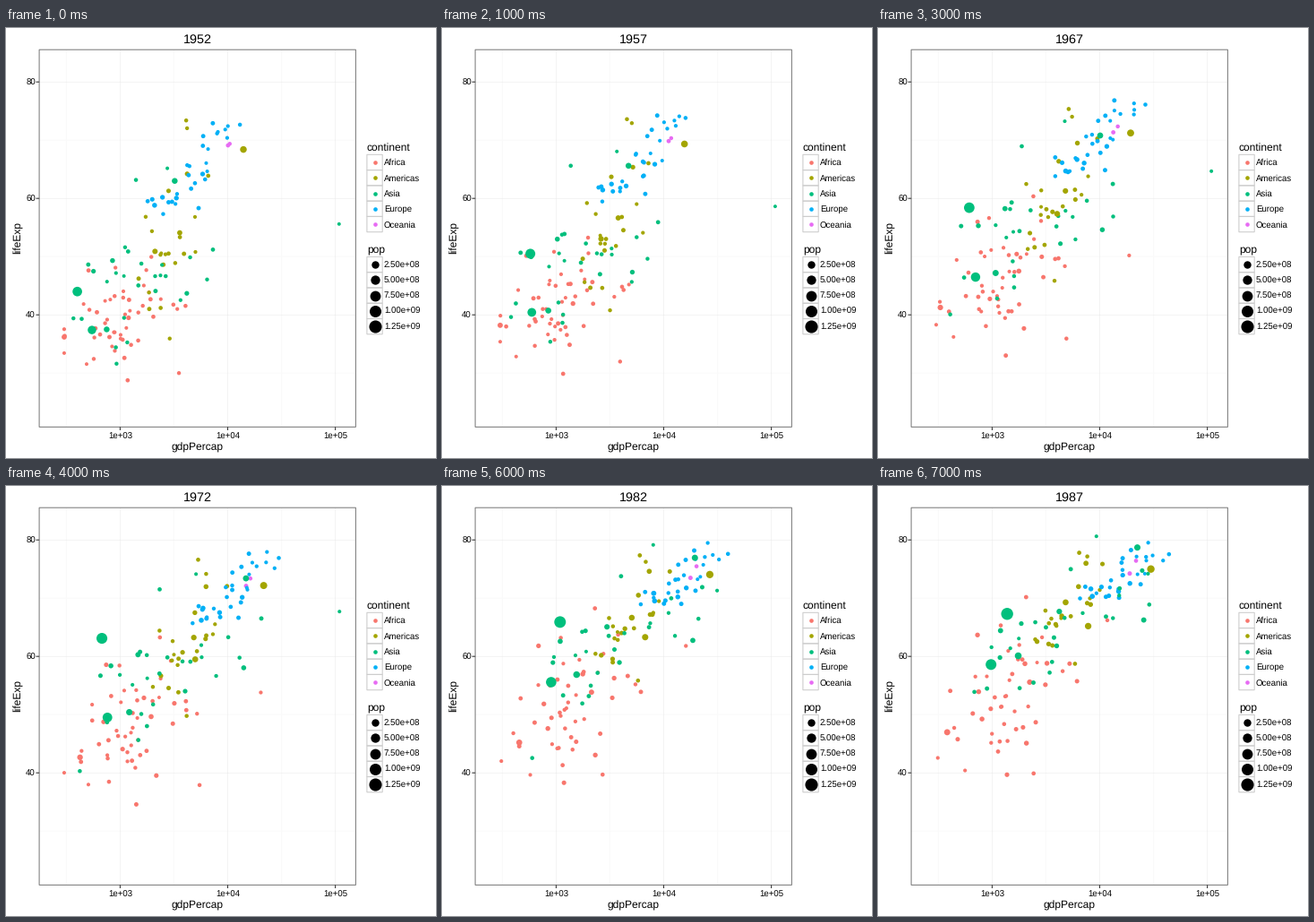
A matplotlib script for the animation above (8000 ms loop, 480 by 480 pixels).

```python
import matplotlib.pyplot as plt
import numpy as np
from matplotlib.animation import FuncAnimation
from matplotlib.patches import Rectangle

SIZE, DPI = 480, 72          # one point equals one pixel
YEARS = np.arange(1952, 1988, 5)
T = np.linspace(0, 1, len(YEARS))
LEFT, TOP, RIGHT, BOTTOM = 37.1, 24.2, 390.4, 445.4

COLORS = {"Africa": "#F8766D", "Americas": "#A3A500", "Asia": "#00BF7D",
          "Europe": "#00B0F6", "Oceania": "#E76BF3"}

# Each cloud: count, yearly population growth, first and last state, and the
# bends of the income and life paths. A state holds the mean and spread of
# log income, the mean and spread of life, and their correlation.
CLOUDS = {
    "Africa": (50, .026, (2.97, .26, 39.2, 4.7, .4),
               (3.14, .29, 53.3, 7.2, .55), (.5, .15)),
    "Americas": (23, .021, (3.47, .17, 53.2, 9, .6),
                 (3.71, .18, 68, 5.5, .75), (.5, .2)),
    "Oceania": (2, .017, (4.01, .01, 69.25, .15, 1),
                (4.31, .03, 75.3, 1, 1), (.15, 0)),
    "Europe": (30, .006, (3.68, .23, 64.6, 5, .85),
               (4.2, .2, 73.8, 2.6, .8), (.6, .6)),
    "Asia": (27, .021, (3.2, .3, 46.5, 8, .45),
             (3.62, .47, 65, 7, .75), (.1, .25)),
}

# Dots that stand out: continent, millions, growth, then turning points
# as (year, income, life).
LANDMARKS = [
    ("Asia", 556, .019, (52, 400, 44), (57, 576, 50.5), (62, 488, 44.5),
     (67, 613, 58.4), (72, 677, 63.1), (87, 1379, 67.3)),
    ("Asia", 372, .0215, (52, 547, 37.4), (87, 977, 58.6)),
    ("Asia", 82, .021, (52, 750, 37.5), (87, 1748, 60.1)),
    ("Asia", 86, .01, (52, 3217, 63), (72, 14779, 73.4), (87, 22376, 78.7)),
    ("Asia", .2, .06, (52, 108382, 55.6), (72, 109348, 67.7),
     (82, 31354, 71.3), (87, 28118, 74.2)),
    ("Asia", 4.7, .015, (52, 368, 39.4), (72, 422, 40.3), (77, 525, 31.2),
     (87, 684, 53.9)),
    ("Americas", 158, .0125, (52, 13990, 68.4), (87, 29884, 75)),
    ("Americas", 57, .026, (52, 2109, 50.9), (72, 4986, 59.5),
     (87, 7807, 65.2)),
    ("Africa", 1, .04, (52, 2388, 42.7), (67, 18773, 50.2),
     (77, 21951, 57.4), (87, 11771, 66.2)),
    ("Africa", 4.2, .02, (52, 3521, 30), (72, 5473, 37.9), (77, 3009, 39.5),
     (87, 2430, 39.9)),
]


def to_x(log_gdp):
    return 127.4 + 120.1 * (log_gdp - 3)


def to_y(life):
    return 60.2 + 6.5 * (80 - life)


def diameter(millions):
    return 3.8 + 10.6 * np.sqrt(millions / 1318.7)


def bent(a, b, bend):
    """Path from a to b that runs ahead of a straight line by the bend."""
    return a + (b - a) * (T + bend * T * (1 - T))


rng = np.random.default_rng(52)
dots = []


def add(continent, millions, growth, log_gdp, life):
    size = diameter(millions * np.exp(growth * (YEARS - YEARS[0])))
    dots.append((COLORS[continent], to_x(log_gdp), to_y(life), size ** 2))


def spread(n):
    z = np.clip(rng.normal(size=n), -2, 2)
    return (z - z.mean()) / z.std()


def add_cloud(continent, n, growth, first, last, bends):
    bend_x, bend_y = bends
    mid_x, sd_x, mid_y, sd_y, corr = (
        bent(a, b, bend)
        for a, b, bend in zip(first, last, (bend_x, 0, bend_y, 0, 0)))
    for u, v in zip(spread(n), spread(n)):
        drift = rng.normal(0, .15, (2, len(T))).cumsum(axis=1)
        drift -= drift.mean(axis=1, keepdims=True)
        log_gdp = mid_x + sd_x * (u + drift[0])
        side = np.sqrt(1 - corr ** 2) * v
        life = mid_y + sd_y * (corr * u + side + .5 * drift[1])
        millions = min(np.exp(rng.normal(1.5, 1.1)), 60)
        add(continent, millions, growth, np.maximum(log_gdp, 2.48), life)


for continent, cloud_rule in CLOUDS.items():
    add_cloud(continent, *cloud_rule)
for continent, millions, growth, *turns in LANDMARKS:
    when, gdp, life = np.array(turns).T
    add(continent, millions, growth,
        np.interp(YEARS - 1900, when, np.log10(gdp)),
        np.interp(YEARS - 1900, when, life))

colors, *paths = zip(*dots)
xs, ys, areas = map(np.array, paths)

plt.rcParams.update({"font.family": "Liberation Sans", "text.hinting": "none"})
fig = plt.figure(figsize=(SIZE / DPI, SIZE / DPI), dpi=DPI, facecolor="white")
ax = fig.add_axes([0, 0, 1, 1])
ax.set_xlim(0, SIZE)
ax.set_ylim(SIZE, 0)
ax.axis("off")


def line(x, y, color, width, z=1):
    ax.plot(x, y, color=color, lw=width, zorder=z, solid_capstyle="butt",
            snap=False)


def box(x, y, w, h, color):
    ax.add_patch(Rectangle((x, y), w, h, fill=False, ec=color, lw=1.07,
                           zorder=4, snap=False))


def text(x, y, s, size, ha="left", va="baseline", **kw):
    return ax.text(x, y, s, fontsize=size, ha=ha, va=va, **kw)


def grid(logs, lives, color, width):
    for v in logs:
        line([to_x(v)] * 2, [TOP, BOTTOM], color, width)
    for v in lives:
        line([LEFT, RIGHT], [to_y(v)] * 2, color, width)


grid((2.5, 3.5, 4.5), (30, 50, 70), "#FAFAFA", 1.07)
grid((3, 4, 5), (40, 60, 80), "#E5E5E5", .43)
box(LEFT, TOP, RIGHT - LEFT, BOTTOM - TOP, "#7F7F7F")

for v in (3, 4, 5):
    line([to_x(v)] * 2, [BOTTOM, BOTTOM + 3.6], "#333333", 1.07, 5)
    text(to_x(v), 458.8, f"1e+0{v}", 9.6, "center")
for v in (40, 60, 80):
    line([LEFT - 3.6, LEFT], [to_y(v)] * 2, "#333333", 1.07, 5)
    text(32.8, to_y(v) + 3.5, str(v), 9.6, "right")
text(213.8, 472, "gdpPercap", 12, "center")
text(13.5, 233.5, "lifeExp", 12, "center", "center", rotation=90)
title = text(214, 17.2, "", 14.4, "center")


def legend(name, title_y, top, entries):
    text(402.8, title_y, name, 12)
    for i, (label, color, size) in enumerate(entries):
        y = top + 17.28 * i
        box(402.9, y, 17.28, 17.28, "#CCCCCC")
        ax.scatter([411.5], [y + 8.64], s=size ** 2, c=color, lw=0, zorder=5)
        text(422, y + 12.1, label, 9.6)


legend("continent", 137, 141.3,
       [(name, c, 4.6) for name, c in COLORS.items()])
legend("pop", 250.8, 255.4,
       [(f"{m * 1e6:.2e}", "black", diameter(m))
        for m in range(250, 1251, 250)])

cloud = ax.scatter(xs[:, 0], ys[:, 0], s=areas[:, 0], c=colors, lw=0, zorder=3)


def draw(i):
    cloud.set_offsets(np.column_stack([xs[:, i], ys[:, i]]))
    cloud.set_sizes(areas[:, i])
    title.set_text(str(YEARS[i]))
    return cloud, title


anim = FuncAnimation(fig, draw, frames=len(YEARS), interval=1000,
                     init_func=lambda: draw(0), repeat=True, repeat_delay=0)
plt.show()
```
